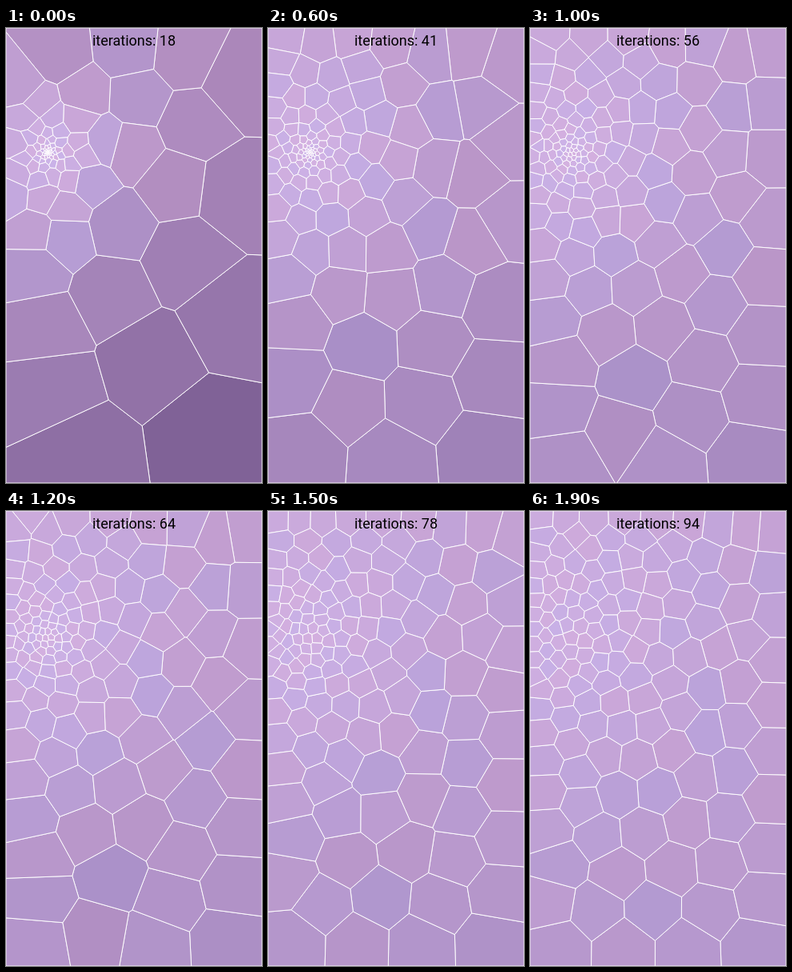
Recreate the animation shown at these times as an HTML page. Size 320 px wide and 569 px high, loop 2 s.

```html
<!DOCTYPE html>
<html lang="en">
<head>
<meta charset="utf-8">
<title>Voronoi relaxation</title>
<style>
  html, body { margin: 0; width: 100%; height: 100%; overflow: hidden; background: #b8a0d0; }
  svg { display: block; width: 100%; height: 100%; }
  path { stroke: #fff; stroke-width: 0.95; stroke-linejoin: round; }
  text { font: 18px Roboto, sans-serif; text-anchor: middle; fill: #000; }
</style>
</head>
<body>
<svg viewBox="0 0 320 569"><g id="cells"></g><text id="label" x="160" y="22"></text></svg>
<script>
const W = 320, H = 569, STEP = 100, STEPS = 20, FIRST = 18, LAST = 94;
const COUNT = 142, HUB = [52.5, 155.5];

// Centers of the largest starting cells; a log spiral fills the rest.
const keys = [
  [253, 508], [96, 529], [55, 456], [179, 421], [279, 367], [50, 376], [133, 334],
  [226, 289], [287, 208], [291, 65], [238, 122], [225, 34], [149, 27], [167, 88],
  [161, 155], [209, 198], [145, 247], [79, 268], [35, 307]
];

let seed = 7;
const rand = () => (seed = seed * 16807 % 2147483647) / 2147483647;
const dist = (a, b) => Math.hypot(a[0] - b[0], a[1] - b[1]);

// Clip the stage by the bisectors to the other sites, nearest first.
function cellOf(sites, i) {
  const [x, y] = sites[i];
  const near = sites
    .map(s => [s[0] - x, s[1] - y, dist(s, sites[i])])
    .filter(n => n[2] > 0)
    .sort((a, b) => a[2] - b[2]);
  let poly = [[0, 0], [W, 0], [W, H], [0, H]];
  for (const [dx, dy, d] of near) {
    if (d > 2 * Math.max(...poly.map(p => dist(p, sites[i])))) break;
    const side = p => (p[0] - x) * dx + (p[1] - y) * dy - d * d / 2;
    const cut = [];
    poly.forEach((a, k) => {
      const b = poly[(k + 1) % poly.length], sa = side(a), sb = side(b);
      if (sa <= 0) cut.push(a);
      if ((sa < 0) !== (sb < 0)) {
        const t = sa / (sa - sb);
        cut.push([a[0] + (b[0] - a[0]) * t, a[1] + (b[1] - a[1]) * t]);
      }
    });
    poly = cut;
  }
  return poly;
}

// Area and centroid, measured from the first corner for accuracy.
function measure(poly) {
  const [ox, oy] = poly[0];
  let area = 0, cx = 0, cy = 0;
  for (let k = 1; k < poly.length - 1; k++) {
    const ax = poly[k][0] - ox, ay = poly[k][1] - oy;
    const bx = poly[k + 1][0] - ox, by = poly[k + 1][1] - oy;
    const cross = ax * by - ay * bx;
    area += cross / 2;
    cx += cross * (ax + bx) / 6;
    cy += cross * (ay + by) / 6;
  }
  return { area, center: area > 1e-9 ? [ox + cx / area, oy + cy / area] : [ox, oy] };
}

const relax = sites => sites.map((s, i) => measure(cellOf(sites, i)).center);

function startSites() {
  const sites = keys.slice();
  for (let i = 0; sites.length < COUNT; i++) {
    const r = 128 * Math.exp(-i / 20) * (0.92 + 0.16 * rand());
    const a = i * 2.39996 + 0.35 * (rand() - 0.5);
    const p = [HUB[0] + r * Math.cos(a), HUB[1] + r * Math.sin(a)];
    const inside = p[0] > 4 && p[1] > 4;
    if (inside && keys.every(k => dist(k, p) > 0.42 * r)) sites.push(p);
  }
  // Sites trail their cell centers, so step the key points back once.
  const next = relax(sites);
  return sites.map((s, i) =>
    i < keys.length ? [2 * s[0] - next[i][0], 2 * s[1] - next[i][1]] : s);
}

const history = [startSites()];
while (history.length <= LAST - FIRST) history.push(relax(history[history.length - 1]));
const tints = history[0].map(() => rand() * 2 - 1);

// The counter runs at a slightly uneven pace.
function iterationAt(step) {
  const marks = [[0, FIRST], [12, 64], [15, 78], [19, LAST]];
  const k = Math.max(1, marks.findIndex(m => m[0] >= step));
  const [s0, n0] = marks[k - 1], [s1, n1] = marks[k];
  return Math.floor(n0 + (n1 - n0) * (step - s0) / (s1 - s0));
}

// Larger cells are darker; each cell leans a little to pink or blue.
function fillFor(area, tint) {
  const k = Math.sqrt(Math.max(area, 0));
  const r = 210 - 0.3 * k - 0.0024 * k * k + 5 * tint;
  const g = 180 - 0.3 * k - 0.0025 * k * k - tint;
  const b = 230 - 0.22 * k - 0.003 * k * k - 4 * tint;
  return `rgb(${Math.round(r)},${Math.round(g)},${Math.round(b)})`;
}

function buildView(step) {
  const n = iterationAt(step), sites = history[n - FIRST];
  const cells = sites.map((s, i) => {
    const poly = cellOf(sites, i);
    return {
      d: "M" + poly.map(p => p[0].toFixed(2) + " " + p[1].toFixed(2)).join("L") + "Z",
      fill: fillFor(measure(poly).area, tints[i])
    };
  });
  return { n, cells };
}

const views = Array.from({ length: STEPS }, (_, step) => buildView(step));
const group = document.getElementById("cells");
const label = document.getElementById("label");
const paths = tints.map(() =>
  group.appendChild(document.createElementNS("http://www.w3.org/2000/svg", "path")));

let shown = -1;
function draw(time) {
  const step = Math.floor(time / STEP) % STEPS;
  if (step === shown) return;
  shown = step;
  const { n, cells } = views[step];
  cells.forEach((c, i) => {
    paths[i].setAttribute("d", c.d);
    paths[i].setAttribute("fill", c.fill);
  });
  label.textContent = "iterations: " + n;
}

const begin = performance.now();
function tick() {
  draw(Math.max(0, performance.now() - begin));
  requestAnimationFrame(tick);
}
tick();
</script>
</body>
</html>
```
